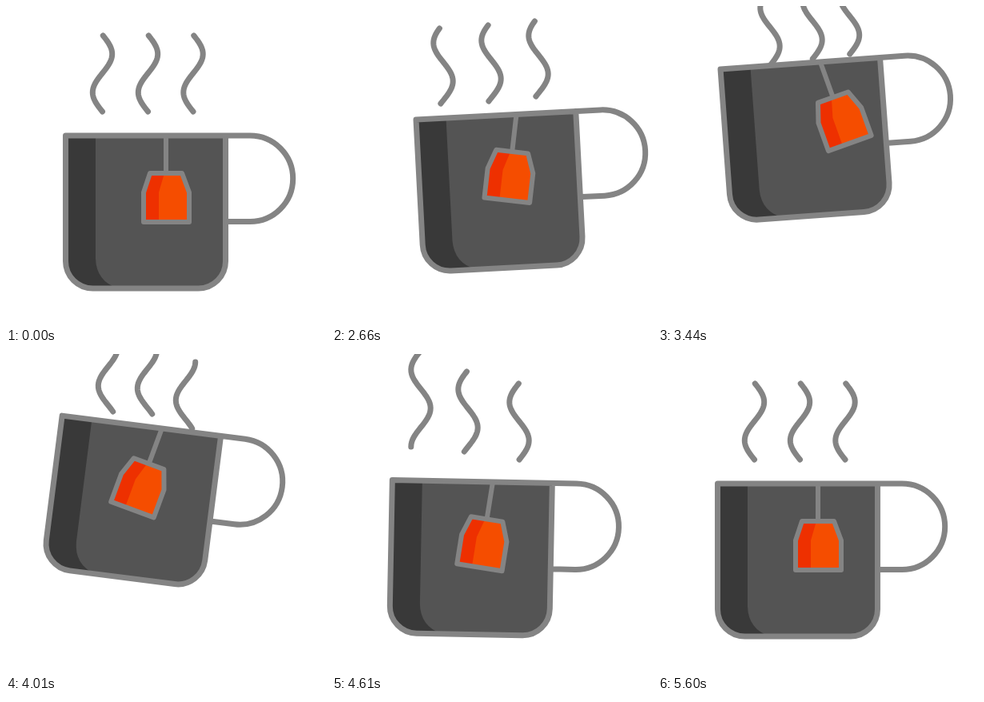
Write an HTML page that moves like this. It is 400x400 px and loops after 5.84 s.

```html
<!DOCTYPE html>
<html lang="en">
<head>
<meta charset="utf-8">
<title>Tea mug</title>
<style>
  html, body { margin: 0; width: 100%; height: 100%; overflow: hidden; background: #fff; }
  svg { display: block; width: 100vw; height: 100vh; }
  .line { fill: none; stroke: #848484; stroke-width: 7; stroke-linecap: round; stroke-linejoin: round; }
</style>
</head>
<body>
<svg viewBox="0 0 400 400">
  <g id="steam" class="line"></g>
  <g id="mug">
    <path fill="#545454" d="M74.5 162H274.5V319A34 34 0 0 1 240.5 353H108.5A34 34 0 0 1 74.5 319Z"/>
    <path fill="#393939" d="M74.5 162H112V316Q113 344 140 353H108.5A34 34 0 0 1 74.5 319Z"/>
    <path class="line" d="M274.5 162V319A34 34 0 0 1 240.5 353H108.5A34 34 0 0 1 74.5 319V162H305A53.7 53.7 0 0 1 305 269.4H277"/>
    <g id="bag">
      <path class="line" style="stroke-width:6" d="M200 163V209"/>
      <path fill="#f54d00" d="M180 209H220L229 233V270H172V233Z"/>
      <path fill="#ee3000" d="M180 209H198L191 233V270H172V233Z"/>
      <path class="line" style="stroke-width:6" d="M180 209H220L229 233V270H172V233Z"/>
    </g>
  </g>
</svg>
<script>
const LOOP = 5840, HOLD = 2000, STEP = 30, STEPS = 120;
const AMPLITUDE = 12.2, PERIOD = 96;

// Smooth curve through [step, value] pairs, at rest at both ends and at every peak.
function curve(...keys) {
  const slope = i => {
    if (i === 0 || i === keys.length - 1) return 0;
    const [a, b, c] = [keys[i - 1], keys[i], keys[i + 1]];
    const before = (b[1] - a[1]) / (b[0] - a[0]);
    const after = (c[1] - b[1]) / (c[0] - b[0]);
    return before * after <= 0 ? 0 : 2 * before * after / (before + after);
  };
  return n => {
    const last = keys.length - 1;
    if (n >= keys[last][0]) return keys[last][1];
    const i = keys.findIndex((k, j) => j < last && n < keys[j + 1][0]);
    const [x0, y0] = keys[i], [x1, y1] = keys[i + 1];
    const w = x1 - x0, u = (n - x0) / w, v = 1 - u;
    return v * v * ((1 + 2 * u) * y0 + u * w * slope(i))
         + u * u * ((1 + 2 * v) * y1 - v * w * slope(i + 1));
  };
}

// Steam follows the mug through the same moments.
const follow = (...values) =>
  curve([0, 0], ...[22, 48, 67, 87, 100].map((n, i) => [n, values[i]]), [STEPS, 0]);
const ripple = (...values) =>
  curve([0, 0], ...[22, 48, 67, 87].map((n, i) => [n, values[i]]), [STEPS, 6 * Math.PI]);

const mugMotion = {
  x: curve([0, 0], [10, 13.5], [20, 34], [24, 36], [40, 26], [48, 10.3], [60, -9], [68, -17.5], [80, -6], [87, -1], [93, 0]),
  y: curve([0, 0], [10, -4], [22, -25.4], [40, -69], [48, -90.5], [55, -98], [67, -73], [80, -18], [87, -2.5], [93, 0]),
  angle: curve([0, 0], [22, -3], [41, -5], [48, -4.2], [60, 3.5], [69, 7.6], [80, 4], [87, 1.1], [94, 0])
};
const bagAngle = curve([0, 0], [22, 9.5], [48, -15.5], [67, 13], [72, 15.5], [87, 8], [103, -4.5], [STEPS, 0]);

const waves = [
  { axis: 120.5, x: follow(18.5, 19.5, 7, -9.5, -8.5), top: follow(-9, -60, -85, -42, -18),
    bottom: follow(-10, -58, -60, -16, -3), phase: ripple(3.4, 9.4, 13.1, 17.3) },
  { axis: 177.5, x: follow(21.5, 15.5, -1, -7.5, -3), top: follow(-13, -68, -64, -15, -6),
    bottom: follow(-13, -66, -57, -10, -2), phase: ripple(3.4, 9.4, 13.1, 16.1) },
  { axis: 234, x: follow(24, 5.5, -9.5, 0, 0), top: follow(-18, -72, -27, 0, 0),
    bottom: follow(-19, -72, -39, 0, 0), phase: ripple(3.4, 9.4, 13.3, 15.7) }
];

const steam = document.getElementById("steam");
const mug = document.getElementById("mug");
const bag = document.getElementById("bag");
for (const wave of waves) {
  wave.path = document.createElementNS("http://www.w3.org/2000/svg", "path");
  steam.append(wave.path);
}

function wavePath(wave, n) {
  const top = 37 + wave.top(n), bottom = 132 + wave.bottom(n);
  const axis = wave.axis + wave.x(n), phase = wave.phase(n), points = [];
  for (let i = 0; i <= 40; i++) {
    const y = top + (bottom - top) * i / 40;
    const x = axis + AMPLITUDE * Math.sin(2 * Math.PI * (y - bottom) / PERIOD + phase);
    points.push(x.toFixed(2) + " " + y.toFixed(2));
  }
  return "M" + points.join("L");
}

function draw(time) {
  const n = Math.min(STEPS, Math.max(0, Math.floor((time % LOOP - HOLD) / STEP)));
  const { x, y, angle } = mugMotion;
  mug.setAttribute("transform", `translate(${x(n)} ${y(n)}) rotate(${angle(n)} 174.5 258)`);
  bag.setAttribute("transform", `rotate(${bagAngle(n)} 200 163)`);
  for (const wave of waves) wave.path.setAttribute("d", wavePath(wave, n));
}

const start = performance.now();
function tick() {
  draw(performance.now() - start);
  requestAnimationFrame(tick);
}
tick();
</script>
</body>
</html>
```
